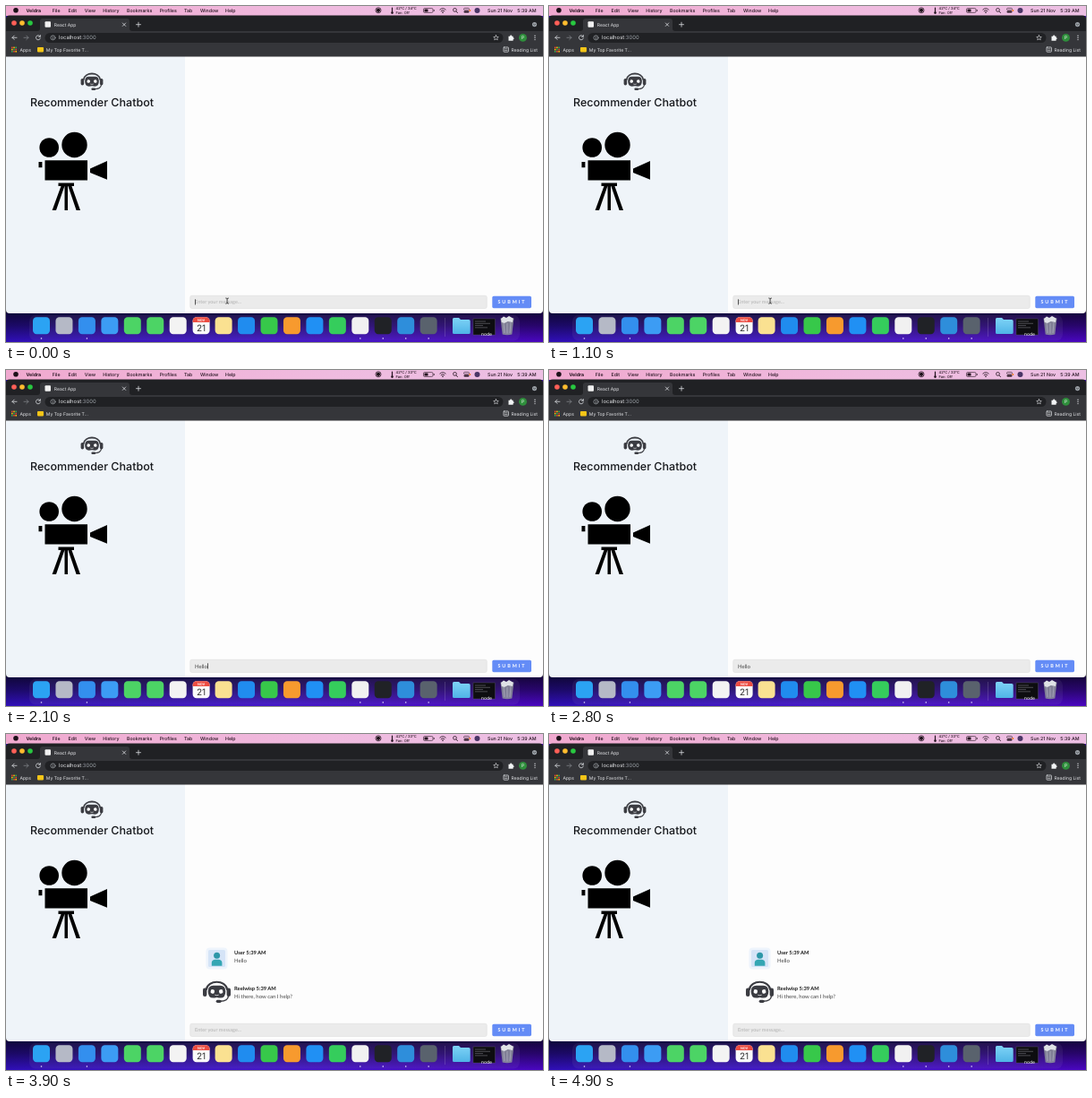
An HTML page for the animation above (5000 ms loop, 600 by 375 pixels).

```html
<!DOCTYPE html>
<html lang="en">
<head>
<meta charset="utf-8">
<title>Recommender Chatbot</title>
<style>
  html, body { margin: 0; width: 100%; height: 100%; overflow: hidden; background: #1c0d6c; }
  svg { display: block; width: 100%; height: 100%; }
  text { white-space: pre; text-rendering: geometricPrecision; }
  .ui { font-family: Inter, Roboto, sans-serif; }
  .menu { font-size: 5.25px; font-weight: 500; fill: #24131f; }
  .bar { font-size: 5.05px; fill: #e4e5e8; }
  .chat { font-family: Lato, "Open Sans", sans-serif; font-size: 6px; fill: #444; }
  .name { font-weight: 700; font-size: 5.8px; fill: #1b1b1b; }
  .hint { font-size: 5.6px; fill: #b0b0b0; }
  .line { fill: none; stroke-linecap: round; stroke-linejoin: round; }
</style>
</head>
<body>
<svg viewBox="0 0 600 375" preserveAspectRatio="none">
  <defs>
    <linearGradient id="wall">
      <stop offset="0" stop-color="#300fb8"/>
      <stop offset=".5" stop-color="#4214cc"/>
      <stop offset="1" stop-color="#4a06c0"/>
    </linearGradient>
    <linearGradient id="shade" x2="0" y2="1">
      <stop offset="0" stop-color="#060414" stop-opacity=".85"/>
      <stop offset=".5" stop-color="#060414" stop-opacity=".5"/>
      <stop offset="1" stop-color="#060414" stop-opacity="0"/>
    </linearGradient>
    <linearGradient id="top">
      <stop offset="0" stop-color="#f0a9cf"/>
      <stop offset=".6" stop-color="#efbbdf"/>
      <stop offset="1" stop-color="#ecbfe3"/>
    </linearGradient>
    <linearGradient id="folder" x2="0" y2="1">
      <stop offset="0" stop-color="#7fd3f7"/>
      <stop offset="1" stop-color="#4fb4e6"/>
    </linearGradient>
    <g id="bot" fill="#3b3c42">
      <path class="line" d="M-11.6-3C-10-14 10-14 11.6-3" stroke="#3b3c42" stroke-width="2.2"/>
      <rect x="-15.5" y="-4.5" width="4.4" height="9.5" rx="2.1"/>
      <rect x="11.1" y="-4.5" width="4.4" height="9.5" rx="2.1"/>
      <path d="M-4-7.3H4Q9.8-7.3 9.8-.8 9.8 6.6 4 6.6 2.5 6.6 0 6-2.5 6.6-4 6.6-9.8 6.6-9.8-.8-9.8-7.3-4-7.3Z"/>
      <rect x="-2.1" y="-2.2" width="4.2" height="4.4" rx="1.6" fill="#fff" transform="translate(-4.7 -.6)rotate(12)"/>
      <rect x="-2.1" y="-2.2" width="4.2" height="4.4" rx="1.6" fill="#fff" transform="translate(4.7 -.6)rotate(-12)"/>
      <path class="line" d="M-1.8 3.4Q0 4.4 1.8 3.4" stroke="#fff" stroke-width=".7"/>
      <path class="line" d="M13 4.5Q12.4 10 4 10.3" stroke="#3b3c42" stroke-width="1.4"/>
      <rect x="-.8" y="8.7" width="6" height="3.2" rx="1.6"/>
    </g>
  </defs>

  <!-- desktop and menu bar -->
  <rect width="600" height="375" fill="url(#wall)"/>
  <rect y="338" width="600" height="37" fill="url(#shade)"/>
  <rect width="600" height="11" fill="url(#top)"/>
  <circle cx="11" cy="4.8" r="2.8" fill="#1c1018"/>
  <g id="menu" class="ui menu"></g>
  <g fill="none" stroke="#24131f" stroke-width=".8">
    <circle cx="416" cy="4.8" r="3"/>
    <circle cx="416" cy="4.8" r="2.1" fill="#1c1018" stroke="none"/>
    <path class="line" d="M431.5 2v4.6" stroke-width="1.2"/>
    <circle cx="431.5" cy="7.6" r="1.3" fill="#24131f" stroke="none"/>
    <rect x="466.5" y="2.6" width="10.5" height="4.8" rx="1.2" stroke-width=".6"/>
    <rect x="467.5" y="3.5" width="4" height="3" rx=".5" fill="#24131f" stroke="none"/>
    <path d="M478.2 4v2"/>
    <path class="line" d="M484.8 4Q488 1.2 491.2 4M486.1 5.6Q488 4 489.9 5.6"/>
    <circle cx="488" cy="7.2" r=".8" fill="#24131f" stroke="none"/>
    <circle cx="501.5" cy="4.4" r="1.9"/>
    <path class="line" d="M503 6l1.6 1.7"/>
    <rect x="511.5" y="2.4" width="6" height="2.2" rx="1.1" stroke-width=".6"/>
    <rect x="511.5" y="5.4" width="6" height="2.2" rx="1.1" fill="#24131f" stroke="none"/>
    <circle cx="518.3" cy="4.9" r="1" fill="#f27b1b" stroke="none"/>
    <circle cx="526.5" cy="4.9" r="3" fill="#4a3566" stroke="none"/>
  </g>
  <g class="ui" font-size="4" font-weight="500" fill="#24131f">
    <text id="temp" x="435.5" y="4.4">42°C / 34°C</text>
    <text x="435.5" y="9.4">Fan: Off</text>
  </g>

  <!-- browser frame -->
  <path d="M0 14Q0 10.5 4 10.5H596Q600 10.5 600 14V339Q600 343 596 343H4Q0 343 0 339Z" fill="#202124"/>
  <circle cx="9" cy="19" r="2.8" fill="#fe5f57"/>
  <circle cx="18" cy="19" r="2.8" fill="#febc2e"/>
  <circle cx="27" cy="19" r="2.8" fill="#28c840"/>
  <path d="M35 28Q38 28 38 25V17Q38 14 41 14H135Q138 14 138 17V25Q138 28 141 28Z" fill="#35363a"/>
  <rect y="28" width="600" height="28.5" fill="#35363a"/>
  <rect x="43.5" y="17.2" width="6.5" height="6.5" rx="1" fill="#f1f1f1"/>
  <rect x="43.5" y="30" width="512" height="11" rx="5.5" fill="#202124"/>
  <g class="ui bar">
    <text x="53.8" y="22.6">React App</text>
    <text x="59" y="37.4" font-size="5.9">localhost<tspan fill="#9aa0a6">:3000</tspan></text>
    <text x="15.5" y="50.6">Apps</text>
    <text x="44.8" y="50.6">My Top Favorite T...</text>
    <text x="564.6" y="50.6">Reading List</text>
  </g>
  <g class="line" stroke="#dadce0" stroke-width=".8">
    <path d="M130.3 19l3.4 3.4m0-3.4l-3.4 3.4M145.5 20.7h5M148 18.2v5"/>
    <path d="M12 35.3H7m2.2-2.2L7 35.3l2.2 2.2"/>
    <path d="M20 35.3h5m-2.2-2.2l2.2 2.2-2.2 2.2" stroke="#7d8086"/>
    <path d="M38 33.8A2.5 2.5 0 1 0 38.4 36M38.4 32.6v1.7h-1.7"/>
    <path d="M547.5 32.6l.8 1.8 2 .2-1.5 1.3.4 2-1.7-1-1.7 1 .4-2-1.5-1.3 2-.2z" stroke-width=".6"/>
    <rect x="556" y="46" width="5.4" height="5.2" rx=".6"/>
    <path d="M557.4 47.8h2.6M557.4 49.5h2.6" stroke-width=".6"/>
    <circle cx="52.5" cy="35.4" r="2.5" stroke="#bdc1c6" stroke-width=".6"/>
    <path d="M52.5 34.1v.1M52.5 35.4v1.3" stroke="#bdc1c6" stroke-width=".6"/>
  </g>
  <circle cx="590.5" cy="20.6" r="2.6" fill="#9aa0a6"/>
  <path class="line" d="M589.4 20.2l1.1 1.1 1.1-1.1" stroke="#202124" stroke-width=".6"/>
  <path d="M561.5 33.7h1.6a1.1 1.1 0 0 1 2.2 0h1.3v1.6a1 1 0 0 1 0 2v1.4h-5.1z" fill="#f1f3f4"/>
  <circle cx="577.5" cy="35.4" r="4.4" fill="#2f8f3c"/>
  <text class="ui" x="577.5" y="37.2" font-size="5" fill="#fff" text-anchor="middle">P</text>
  <g id="dots" fill="#dadce0"></g>
  <g id="apps"></g>
  <rect x="35" y="46" width="7" height="5.4" rx=".8" fill="#f5c518"/>

  <!-- page -->
  <path d="M0 56.5H200V343H4Q0 343 0 339Z" fill="#eff4f9"/>
  <path d="M200 56.5H600V339Q600 343 596 343H200Z" fill="#fdfdfd"/>
  <use href="#bot" transform="translate(96 84.5)scale(.8)"/>
  <text class="ui" x="96" y="112.2" font-size="12.5" font-weight="500" fill="#16181c" text-anchor="middle">Recommender Chatbot</text>
  <g>
    <circle cx="48.2" cy="158" r="10.8"/>
    <circle cx="76.5" cy="155" r="14.2"/>
    <path d="M43.5 172.3H91V194.5H43.5ZM36.5 174H40.4V180.3H36.5ZM94 181.5L113 173V193.8L94 186Z"/>
    <path d="M58.5 197.5H76V201H58.5ZM65.5 201H69V228H65.5ZM61.5 201H65.4L56 228H51.6ZM69.4 201H73.4L83 228H78.6Z"/>
  </g>

  <g id="talk">
    <rect x="223.5" y="238.5" width="24" height="24" rx="4" fill="#eef4fc"/>
    <rect x="226" y="241" width="19" height="19" rx="1.5" fill="#d5e4f7"/>
    <path d="M229.8 258.8V255.5Q229.8 252.2 233.2 251.8H238Q241.4 252.2 241.4 255.5V258.8Z" fill="#34a6b3"/>
    <circle cx="235.6" cy="247.3" r="3.5" fill="#2e97a8"/>
    <text class="chat name" x="255" y="245.7">User 5:39 AM</text>
    <text class="chat" x="255" y="254.7">Hello</text>
    <use href="#bot" transform="translate(235.5 288)"/>
    <text class="chat name" x="255" y="285.7">Reelwisp 5:39 AM</text>
    <text class="chat" x="255" y="294.7">Hi there, how can I help?</text>
  </g>

  <rect x="205.8" y="323.3" width="331.4" height="14.2" rx="1.8" fill="#ebebeb" stroke="#dedede" stroke-width=".6"/>
  <text id="hint" class="chat hint" x="211" y="332.4">Enter your message...</text>
  <text id="typed" class="chat" x="211" y="332.5"></text>
  <rect id="caret" y="327.3" width=".8" height="6.2" fill="#333"/>
  <path id="mouse" class="line" d="M245.7 326q1.4 0 1.4.8V331.4q0 .8-1.4.8M248.5 326q-1.4 0-1.4.8M247.1 331.4q0 .8 1.4.8" stroke="#222" stroke-width=".8"/>
  <rect x="543.3" y="323.8" width="43.7" height="13.4" rx="1.6" fill="#648cf6"/>
  <text class="chat" x="549.5" y="332.4" style="font-size:5.4px;font-weight:700;letter-spacing:1.9px;fill:#fff">SUBMIT</text>

  <!-- dock -->
  <rect x="26" y="345" width="548" height="28.5" rx="7" fill="#fff" fill-opacity=".05"/>
  <path d="M490.5 348V369" stroke="#fff" stroke-opacity=".25" stroke-width=".6"/>
  <g id="dock"></g>
  <rect x="208.6" y="347.3" width="19" height="19" rx="4.2" fill="#fafafa"/>
  <path d="M208.6 353V351.5a4.2 4.2 0 0 1 4.2-4.2H223.4a4.2 4.2 0 0 1 4.2 4.2V353Z" fill="#ec4d42"/>
  <g class="ui" text-anchor="middle">
    <text x="218.1" y="352" font-size="3.8" font-weight="600" fill="#fff">NOV</text>
    <text x="218.1" y="363.2" font-size="10" fill="#333">21</text>
  </g>
  <path d="M499 349.5Q499 348 500.5 348H506L508 350H517Q518.7 350 518.7 351.5V364.5Q518.7 366 517 366H500.5Q499 366 499 364.5Z" fill="url(#folder)"/>
  <rect x="522" y="349" width="24.5" height="18" fill="#0d0d10" stroke="#5a5a66" stroke-width=".4"/>
  <path d="M524 352h12M524 354.3h17M524 356.6h9M524 358.9h14" stroke="#8a8a92" stroke-width=".5"/>
  <text class="ui" x="537" y="368" font-size="5" fill="#fff" text-anchor="middle">node</text>
  <path d="M552.5 348.5H567.5L565.3 366.5Q560 368 554.7 366.5Z" fill="#8d929b" fill-opacity=".85"/>
  <path d="M553 349l3-2.5 3 1.5 3-2 4.8 2.8-1 4.2-5-1-4 2-3-1z" fill="#dfe2e6"/>
  <path d="M556 353l1 12M560 354v11.5M564 353l-1 12" stroke="#c5c9d0" stroke-width=".5"/>
</svg>

<script>
const $ = id => document.getElementById(id);
const LOOP = 5000;

function add(parent, tag, attrs, text) {
  const el = document.createElementNS("http://www.w3.org/2000/svg", tag);
  for (const k in attrs) el.setAttribute(k, attrs[k]);
  if (text) el.textContent = text;
  $(parent).append(el);
}

[["Veldra", 22.5], ["File", 51.7], ["Edit", 69.5], ["View", 87.7], ["History", 108.3],
 ["Bookmarks", 135], ["Profiles", 171.7], ["Tab", 199], ["Window", 217], ["Help", 245],
 ["Sun 21 Nov", 538], ["5:39 AM", 571.3]].forEach(([label, x], i) =>
  add("menu", "text", { x, y: 6.8, "font-weight": i ? 500 : 700 }, label));

for (let i = 0; i < 3; i++) add("dots", "circle", { cx: 591, cy: 33.2 + i * 2.2, r: .7 });

const gridColors = ["#ea4335", "#fbbc04", "#34a853"];
for (let i = 0; i < 9; i++)
  add("apps", "rect", {
    x: 6 + i % 3 * 2.2, y: 45.6 + Math.floor(i / 3) * 2.2,
    width: 1.6, height: 1.6, fill: gridColors[(i + Math.floor(i / 3)) % 3]
  });

// plain tiles, left to right; an empty colour leaves room for the calendar
const tiles = ["#2ba3f3", "#b5b9c6", "#338fee", "#3c9cf4", "#4cd465", "#4cd465", "#f3f3f3", "",
  "#fae191", "#208cef", "#37c84a", "#f79a2e", "#2090f4", "#35cd5c", "#f1f1f1", "#202226",
  "#2e8edb", "#59626d"];
const running = [0, 2, 14, 15, 16, 17];
tiles.forEach((fill, i) => {
  const cx = 39.5 + i * 25.45;
  if (fill) add("dock", "rect", { x: cx - 9.5, y: 347.3, width: 19, height: 19, rx: 4.2, fill });
  if (running.includes(i)) add("dock", "circle", { cx, cy: 371, r: .8, fill: "#e8e4ff" });
});

// time, typed text, caret visible
const steps = [
  [0, "", 1], [500, "", 0], [1000, "", 1],
  [1300, "H", 1], [1400, "He", 1], [1700, "Hel", 1], [1800, "Hell", 1], [2000, "Hello", 1],
  [2500, "Hello", 0], [3000, "Hello", 1],
  [3100, "", 1], [3600, "", 0], [4100, "", 1], [4600, "", 0]
];
const TYPING = 1300, COOLER = 1900, REPLY = 3900;
const show = (id, on) => $(id).setAttribute("visibility", on ? "visible" : "hidden");

function draw(t) {
  const [, text, caret] = steps.findLast(s => s[0] <= t);
  $("typed").textContent = text;
  $("caret").setAttribute("x", 211 + (text ? $("typed").getComputedTextLength() + .3 : 0));
  $("temp").textContent = t < COOLER ? "42°C / 34°C" : "42°C / 33°C";
  show("caret", caret);
  show("hint", !text);
  show("mouse", t < TYPING);
  show("talk", t >= REPLY);
}

const start = performance.now();
function tick() {
  draw((performance.now() - start) % LOOP);
  requestAnimationFrame(tick);
}
tick();
</script>
</body>
</html>
```
